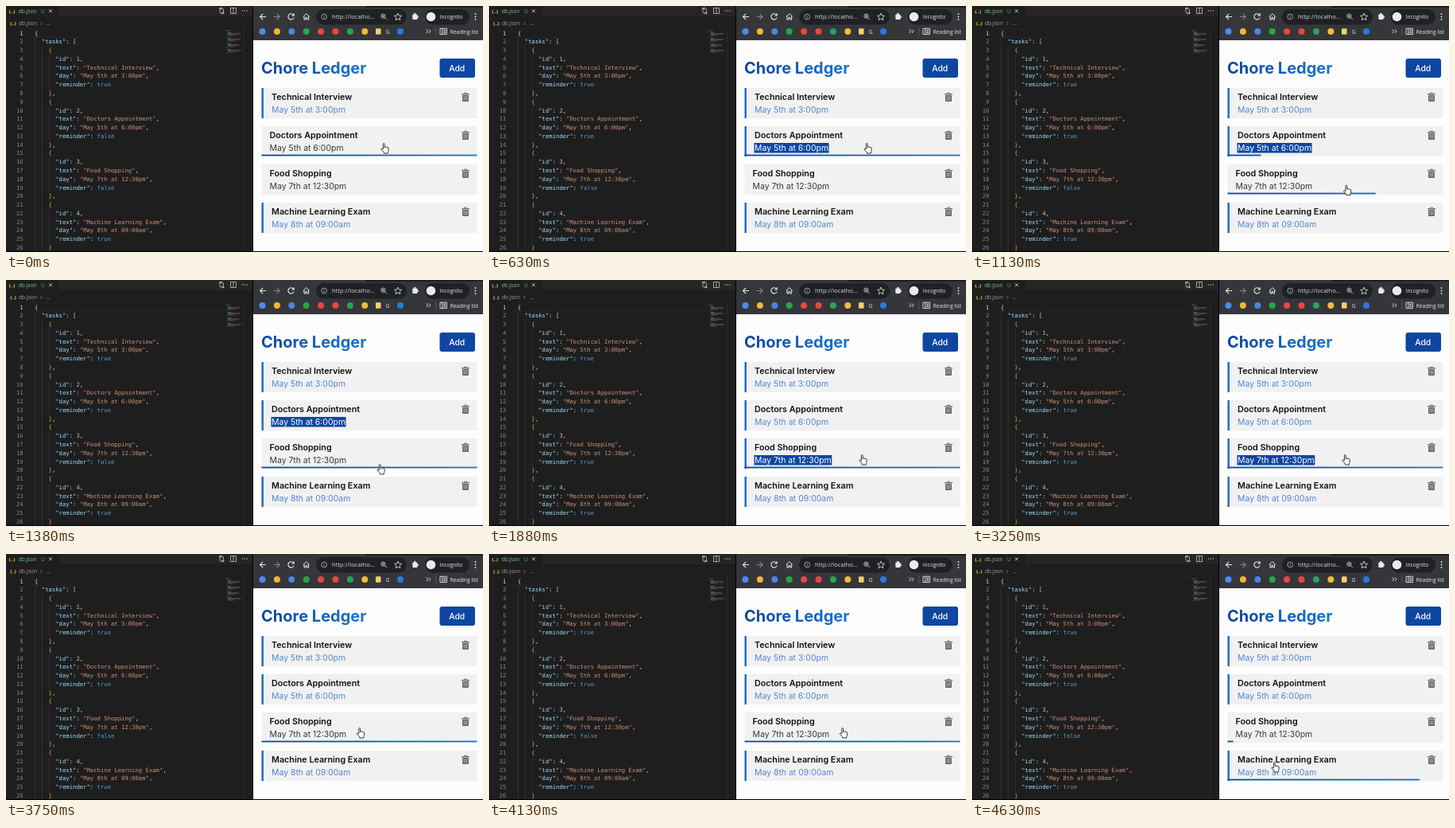
These frames come from a looping animation (600x309 px, 4.76 s). An HTML page with a canvas:

```html
<!DOCTYPE html>
<html lang="en">
<head>
<meta charset="utf-8">
<title>Chore Ledger</title>
<style>
html, body { margin: 0; width: 100%; height: 100%; overflow: hidden; background: #000; }
canvas { display: block; width: 600px; height: 309px; }
</style>
</head>
<body>
<canvas id="stage"></canvas>
<script>
const W = 600, H = 309, FLOOR = 308, LOOP = 4760, STEP = 125, LAST = 37;
const MONO = '7.24px "DejaVu Sans Mono", "Noto Sans Mono", monospace';
const UI = '"Open Sans", "Noto Sans", sans-serif';
const PAGE = 'Inter, sans-serif';
const NAVY = '#0d47a1', BLUE = '#1976d2';

const canvas = document.getElementById('stage');
const dpr = window.devicePixelRatio || 1;
canvas.width = Math.round(W * dpr);
canvas.height = Math.round(H * dpr);
const ctx = canvas.getContext('2d');
ctx.scale(dpr, dpr);

const tasks = [
  { text: 'Technical Interview', day: 'May 5th at 3:00pm' },
  { text: 'Doctors Appointment', day: 'May 5th at 6:00pm' },
  { text: 'Food Shopping', day: 'May 7th at 12:30pm' },
  { text: 'Machine Learning Exam', day: 'May 8th at 09:00am' }
];

// Timeline in ms
const toggles = [[], [350], [1850, 3700], []];
const starts = [true, false, false, true];
const selections = [null, [350, 1750], [1850, 3550], null];
const hovers = [null, [-999, 961], [1004, 4387], [4442, LOOP]];
const moves = [
  { from: 0, to: 0, x: 471.4, y: 172 },
  { from: 830, to: 1200, x: 466.4, y: 231 },
  { from: 1400, to: 1650, x: 465.4, y: 219 },
  { from: 3260, to: 3540, x: 440.8, y: 218 },
  { from: 4215, to: 4600, x: 376.4, y: 261 }
];

const clamp = v => Math.min(1, Math.max(0, v));
const smooth = u => u * u * (3 - 2 * u);

// CSS "ease": cubic-bezier(.25, .1, .25, 1)
function ease(x) {
  x = clamp(x);
  let lo = 0, hi = 1, s = x;
  for (let i = 0; i < 20; i++) {
    s = (lo + hi) / 2;
    const bx = 0.75 * s * (1 - s) * (1 - s) + 0.75 * s * s * (1 - s) + s * s * s;
    if (bx < x) lo = s; else hi = s;
  }
  return 0.3 * s * (1 - s) * (1 - s) + 3 * s * s * (1 - s) + s * s * s;
}

function rect(x, y, w, h, color) {
  ctx.fillStyle = color;
  ctx.fillRect(x, y, w, h);
}

function round(x, y, w, h, r, color) {
  ctx.fillStyle = color;
  ctx.beginPath();
  ctx.roundRect(x, y, w, h, r);
  ctx.fill();
}

function dot(x, y, r, color) {
  ctx.fillStyle = color;
  ctx.beginPath();
  ctx.arc(x, y, r, 0, Math.PI * 2);
  ctx.fill();
}

function label(str, x, y, font, color, align = 'left') {
  ctx.font = font;
  ctx.fillStyle = color;
  ctx.textAlign = align;
  ctx.fillText(str, x, y);
}

function line(d, color, width = 1, x = 0, y = 0) {
  ctx.save();
  ctx.translate(x, y);
  ctx.strokeStyle = color;
  ctx.lineWidth = width;
  ctx.stroke(new Path2D(d));
  ctx.restore();
}

function gradient(x0, x1) {
  const g = ctx.createLinearGradient(x0, 0, x1, 0);
  g.addColorStop(0, NAVY);
  g.addColorStop(1, BLUE);
  return g;
}

const reminderAt = (i, t) =>
  toggles[i].reduce((on, at) => t >= at ? !on : on, starts[i]);

function underlineAt(i, t) {
  if (!hovers[i]) return 0;
  const [enter, leave] = hovers[i];
  return ease((t - enter) / 300) - ease((t - leave) / 300);
}

function cursorAt(t) {
  let { x, y } = moves[0];
  for (const m of moves.slice(1)) {
    const k = smooth(clamp((t - m.from) / (m.to - m.from)));
    x += (m.x - x) * k;
    y += (m.y - y) * k;
  }
  return { x, y };
}

// Each line: indent followed by [text, colour] pairs
function codeLines(t) {
  const key = '#9cdcfe', str = '#ce9178', plain = '#d4d4d4', gold = '#d8a657';
  const field = (name, value, color, end) =>
    [6, [`"${name}"`, key], [': ', plain], [value, color], [end, plain]];
  const lines = [[0, ['{', '#e6dcae']], [2, ['"tasks"', key], [': ', plain], ['[', plain]]];
  tasks.forEach((task, i) => {
    lines.push(
      [4, ['{', gold]],
      field('id', String(i + 1), '#b5cea8', ','),
      field('text', `"${task.text}"`, str, ','),
      field('day', `"${task.day}"`, str, ','),
      field('reminder', String(reminderAt(i, t)), '#569cd6', ''),
      [4, ['}', gold], [i < 3 ? ',' : '', plain]]
    );
  });
  return lines;
}

function drawEditor(t) {
  const ui = '6.7px ' + UI, grey = '#c5c5c5';
  rect(0, 0, 310, FLOOR, '#1e1e1e');
  rect(67, 0, 243, 13, '#252526');
  label('{..}', 3.5, 8.5, 'bold 6px ' + UI, '#cbcb41');
  label('db.json', 15.7, 8.6, ui, '#73c991');
  label('U', 44, 8.6, ui, '#5fa97b');
  line('M54 4.2l4 4m0-4l-4 4', '#d0d0d0', 0.9);
  label('{..}', 5, 24, 'bold 6px ' + UI, '#cbcb41');
  label('db.json', 16, 24.2, ui, '#a0a0a0');
  line('M43.5 20l2 2l-2 2', '#909090', 0.7);
  label('...', 51, 24.2, ui, '#a0a0a0');

  // Compare, split and menu icons
  line('M269 4v3.5q0 1.5 1.5 1.5h2m-1.5-1.5l1.5 1.5l-1.5 1.5M273.5 8V4.5q0-1.5-1.5-1.5h-2m1.5-1.5L270 3l1.5 1.5', grey, 0.8);
  dot(269, 3, 1, grey);
  dot(273.5, 9, 1, grey);
  line('M282.5 2.5h7v7h-7zM286 2.5v7', grey, 0.8);
  [297.5, 300.3, 303.1].forEach(x => dot(x, 6, 0.7, grey));

  line('M28 28.6h247M28 39.4h247', '#292929', 0.7);
  const pitch = 10.78, cw = 4.36, left = 36.1;
  codeLines(t).forEach((parts, i) => {
    const mid = 34 + i * pitch;
    label(String(i + 1), 21.7, mid + 2.5, MONO, i ? '#858585' : '#d0d0d0', 'right');
    for (let c = 0; c < parts[0]; c += 2)
      rect(left + c * cw + 0.4, mid - pitch / 2, 0.6, pitch, '#3c3c3c');
    let col = parts[0];
    parts.slice(1).forEach(([str, color]) => {
      label(str, left + col * cw, mid + 2.5, MONO, color);
      ctx.globalAlpha = 0.4;
      rect(275.5 + col * 0.55, 29.5 + i * 1.17, str.length * 0.55, 0.75, color);
      ctx.globalAlpha = 1;
      col += str.length;
    });
  });
  rect(299, 28, 0.7, FLOOR - 28, '#303031');
}

function drawBrowser() {
  const pale = '#e8eaed', dim = '#85878b', small = '6.6px ' + UI;
  rect(311, 0, 289, 43, '#35363a');
  rect(452, 0, 148, 2, '#1c1d20');
  line('M327 13.5h-7.5m3.7-3.7l-3.7 3.7l3.7 3.7', pale, 1.1);
  line('M336.7 13.5h7.5m-3.7-3.7l3.7 3.7l-3.7 3.7', dim, 1.1);
  line('M361.6 11.2a3.7 3.7 0 1 0 .5 3.4M362.2 9.2v2.8h-2.8', pale, 1.1);
  line('M373.8 13.4l4-3.7l4 3.7M375 12.6v4.4h1.9v-2.6h1.8v2.6h1.9v-4.4', pale, 1);
  round(390, 4, 114, 19.5, 9.75, '#202124');
  line('M396.8 13.5a3.4 3.4 0 1 0 6.8 0a3.4 3.4 0 1 0-6.8 0M400.2 13v2.3M400.2 11.3v.9', '#b8babd', 0.8);
  label('http://localho...', 410, 16.2, '7.6px ' + UI, '#d6d8db');

  // Zoom, star and extension icons
  line('M471.8 12.7a2.6 2.6 0 1 0 5.2 0a2.6 2.6 0 1 0-5.2 0M476.3 14.6l2.6 2.6M473.1 12.7h2.6M474.4 11.4v2.6', pale, 0.8);
  line('M493 9l1.3 3l3.2.3l-2.4 2.2l.7 3.2l-2.8-1.7l-2.8 1.7l.7-3.2l-2.4-2.2l3.2-.3z', pale, 0.8);
  round(511.3, 10.6, 6.2, 6.4, 1, pale);
  dot(514.3, 10.1, 1.3, pale);
  dot(517.7, 13.7, 1.3, pale);

  round(527, 4, 56, 19.5, 9.75, '#202124');
  dot(534.5, 13.5, 5.8, pale);
  label('Incognito', 545.7, 16, small, pale);
  [10, 13.5, 17].forEach(y => dot(590.5, y, 0.9, pale));

  const marks = ['#4c8bf5', '#f2b735', '#4a86e8', '#25a844', '#e5493a', '#e5493a', '#2ba25c', '#f0bd34'];
  marks.forEach((color, i) => dot(322.5 + i * 18.4, 32, 4, color));
  round(465, 28.3, 6.5, 7.4, 1, '#f3d16b');
  label('G', 477.7, 34.5, small, pale);
  dot(496, 32, 4, '#2579e8');
  line('M528.5 29.5l2.3 2.3l-2.3 2.3M531.8 29.5l2.3 2.3l-2.3 2.3', pale, 0.9);
  rect(540.5, 27, 0.8, 10, '#5f6063');
  line('M546 28.2h8.4v7.4h-8.4zM548.8 28.2v7.4M550.2 30.2h3M550.2 31.9h3M550.2 33.6h3', pale, 0.9);
  label('Reading list', 558.7, 34.6, small, pale);
}

function drawTrash(x, y) {
  const ink = '#656565';
  rect(x, y + 1.4, 10, 1.3, ink);
  line('M3.3 1.4V.5h3.4v.9', ink, 0.9, x, y);
  round(x + 1, y + 3.2, 8, 8, 1, ink);
  [3, 5, 7].forEach(dx => rect(x + dx - 0.35, y + 4.4, 0.7, 5.4, '#d4d3d4'));
}

function drawCard(i, t) {
  const task = tasks[i], x = 321.5, y = 103 + i * 48, w = 271, h = 38;
  const on = reminderAt(i, t), sel = selections[i];
  const tx = on ? 334 : 331.5;
  rect(x, y, w, h, '#f2f1f2');
  if (on) rect(x, y, 2.4, h, '#1a69c2');
  label(task.text, tx, y + 15.3, '600 10.75px ' + PAGE, '#111');

  const font = '10.45px ' + PAGE;
  const picked = sel && t >= sel[0] && t < sel[1];
  if (picked) {
    ctx.font = font;
    rect(tx - 0.5, y + 21, ctx.measureText(task.day).width + 1, 12.5, NAVY);
  }
  label(task.day, tx, y + 30.7, font, picked ? '#fff' : on ? '#5189cf' : '#3a3a3a');
  drawTrash(573, y + 5.7);
  const grown = underlineAt(i, t);
  if (grown > 0.002) rect(x, y + h - 2.4, w * grown, 1.8, gradient(x, x + w));
}

function drawPage(t) {
  rect(311, 43, 289, FLOOR - 43, '#fdfdfd');
  label('Chore Ledger', 321, 85, 'bold 20px ' + PAGE, gradient(321, 453));
  round(545.5, 66, 44.5, 24, 3, NAVY);
  label('Add', 567.2, 81.6, '500 10.4px ' + PAGE, '#fff', 'center');
  tasks.forEach((_, i) => drawCard(i, t));
}

const hand = new Path2D('M3 8V1.5q0-1 .9-1t.9 1V5.5q.2-.8 1-.7t.8.8q.2-.6.9-.5t.8.8q.3-.5.8-.3t.6.9V9.3q0 1.2-.7 2V13H4V11.8L.9 8.3q-.6-.9.1-1.3t1.3.3z');

function drawCursor(t) {
  const { x, y } = cursorAt(t);
  ctx.save();
  ctx.translate(x, y);
  ctx.fillStyle = '#fff';
  ctx.fill(hand);
  ctx.strokeStyle = '#222';
  ctx.lineWidth = 0.9;
  ctx.lineJoin = 'round';
  ctx.stroke(hand);
  ctx.restore();
}

function draw(now) {
  const t = Math.min(LAST, Math.floor((now % LOOP) / STEP)) * STEP;
  rect(0, 0, W, H, '#000');
  drawEditor(t);
  drawBrowser();
  drawPage(t);
  drawCursor(t);
  rect(0, FLOOR, W, H - FLOOR, '#000');
}

let begin = null;
function tick(now) {
  if (begin === null) begin = now;
  draw(now - begin);
  requestAnimationFrame(tick);
}
draw(0);
requestAnimationFrame(tick);
</script>
</body>
</html>
```
